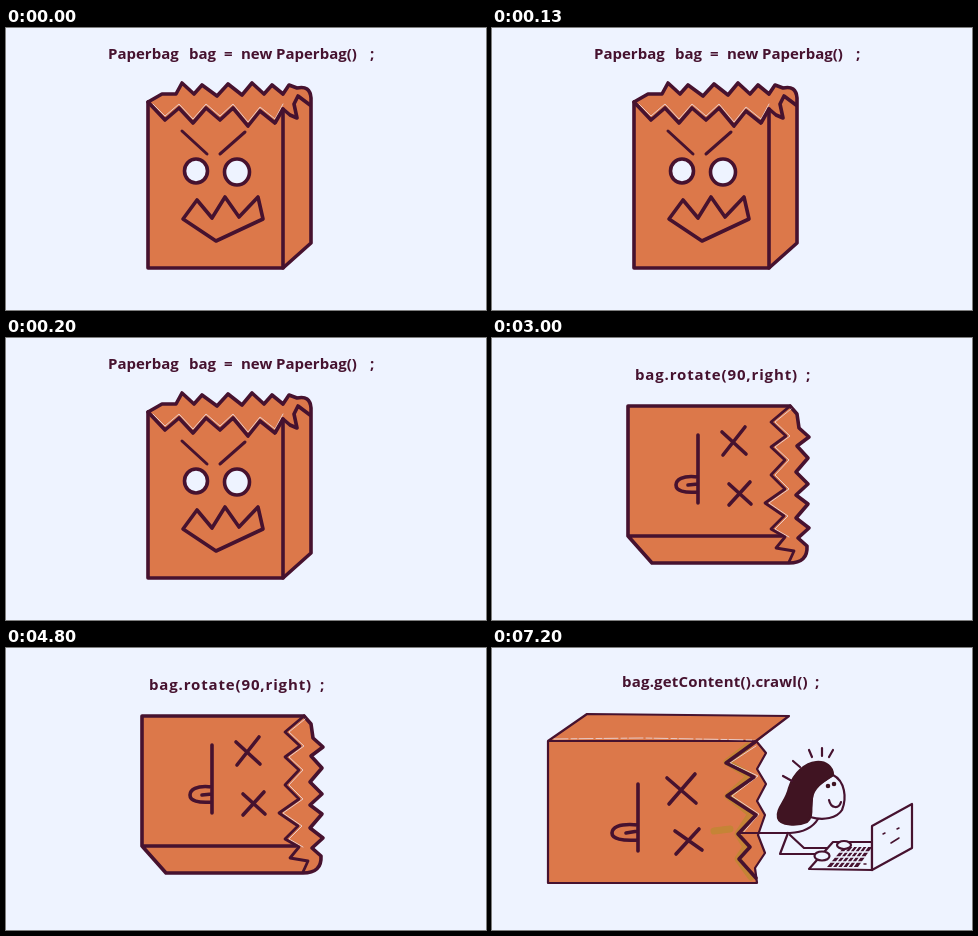
An HTML page that plays this animation: 480 px wide and 282 px high, repeating every 8 s.

```html
<!DOCTYPE html>
<html lang="en">
<head>
<meta charset="utf-8">
<title>Paperbag</title>
<style>
html, body { margin: 0; width: 100%; height: 100%; overflow: hidden; background: #eef3ff; }
svg { display: block; width: 100vw; height: 100vh; }
.scene { fill: none; stroke: #46122f; stroke-width: 3.6; stroke-linejoin: round; stroke-linecap: round; }
.scene:not(.on) { display: none; }
text { font: 700 15px "Open Sans", "Noto Sans", sans-serif; fill: #46122f; stroke: none; white-space: pre; }
.bag { fill: #dc784a; stroke: none; }
.pale { fill: #eef3ff; }
.hair { fill: #401422; stroke: #401422; }
.glint { stroke: #e9ccc9; stroke-width: 1; }
.smear { stroke: #c58436; stroke-width: 7; }
.thin { stroke-width: 2.2; }
</style>
</head>
<body>
<svg viewBox="0 0 480 282" xmlns="http://www.w3.org/2000/svg">
  <rect width="480" height="282" fill="#eef3ff"/>

  <g class="scene on">
    <text y="31"><tspan x="102">Paperbag</tspan> <tspan x="183">bag</tspan> <tspan x="218">=</tspan> <tspan x="235">new</tspan> <tspan x="270">Paperbag()</tspan> <tspan x="364">;</tspan></text>
    <path class="bag" d="M142 74L156 66L170 66L176 55L188 66L196 57L211 68L222 56L236 67L246 55L258 66L266 57L277 66L283 57L291 60Q304 57 305 70V215L277 240H142Z"/>
    <path d="M142 74L156 66L170 66L176 55L188 66L196 57L211 68L222 56L236 67L246 55L258 66L266 57L277 66L283 57L291 60Q304 57 305 70V215L277 240H142V74"/>
    <path class="glint" d="M147 76L159 88L173 76L187 91L200 76L214 88L227 76L242 94L254 79L269 91L277 76"/>
    <path d="M142 74L159 92L173 80L187 95L200 80L214 92L227 80L242 98L254 83L269 95L277 81L284 87L291 90L288 76L292 68L304 77"/>
    <path d="M277 81V240"/>
    <path class="brow" stroke-width="3" d="M176 103L201 126M239 104L214 126"/>
    <ellipse class="pale" cx="190" cy="143" rx="11.5" ry="12"/>
    <ellipse class="pale" cx="231" cy="144" rx="12.5" ry="13"/>
    <path d="M177 191L191 172L206 190L219 169L233 189L252 169L257 191L210 213Z"/>
  </g>

  <g class="scene">
    <text y="42" letter-spacing=".85"><tspan x="143">bag.rotate(90,right)</tspan> <tspan x="314">;</tspan></text>
    <path class="bag" d="M136 68H298L305 76L307 90L317 99L305 108L316 120L304 134L316 146L304 157L316 166L304 180L317 190L306 200L315 208Q316 225 297 225H160L136 198Z"/>
    <path d="M298 68L305 76L307 90L317 99L305 108L316 120L304 134L316 146L304 157L316 166L304 180L317 190L306 200L315 208Q316 225 297 225H160L136 198V68H298M136 198H290"/>
    <path class="glint" d="M299 71L283 84L298 98L283 109L297 122L283 137L297 151L277 165L296 178L283 191L297 199"/>
    <path stroke-width="2.8" d="M298 68L279 84L294 98L279 109L293 122L279 137L293 151L273 165L292 178L279 191L293 199L284 210L302 213L297 224"/>
    <path d="M206 97V165M206 139C190 137 184 142 184 147C184 153 192 155 206 154M206 146L196 147"/>
    <path d="M230 94L254 116M253 89L231 117M237 146L259 166M258 144L237 167"/>
  </g>

  <g class="scene">
    <text y="39" letter-spacing=".2"><tspan x="130">bag.getContent().crawl()</tspan> <tspan x="323">;</tspan></text>
    <path class="bag" d="M56 93L95 66L297 68L265 94L274 105L265 121L274 136L265 153L273 167L266 187L273 205L263 220L265 235H56Z"/>
    <path class="smear" d="M256 98L235 114L258 128L236 148L259 166L246 186L254 199L246 211L259 229M222 183L238 181"/>
    <path class="thin" d="M264 93L297 68L95 66L56 93V235H264M56 93H264"/>
    <path class="glint" d="M62 91L150 90L262 92" stroke-dasharray="14 3 6 2"/>
    <path class="thin" d="M265 94L274 105L265 121L274 136L265 153L273 167L266 187L273 205L263 220L265 235"/>
    <path class="glint" d="M264 98L238 115L266 128L240 148L267 166L250 186"/>
    <path d="M263 94L234 115L262 129L235 148L264 167L246 186L258 199L247 211L264 230"/>
    <path d="M146 136V203M146 177C126 175 120 180 120 185C120 191 130 193 146 192M146 183L134 185"/>
    <path d="M175 130L204 155M203 126L177 156M183 183L210 202M207 181L184 206"/>

    <g class="thin">
      <path d="M248 185H298Q318 184 326 171M296 185L288 206H324M298 187L312 200L346 200"/>
      <path class="pale" d="M341 127C353 133 355 150 350 162C345 170 332 173 318 169L321 140Z"/>
      <path class="hair" d="M286 170C284 160 294 154 297 140C302 124 314 115 324 114C334 113 341 119 341 127C330 134 321 140 320 150C318 160 322 168 315 174C306 178 288 178 286 170Z"/>
      <circle class="hair" cx="336" cy="138" r="1.2"/>
      <circle class="hair" cx="342" cy="136" r="1.2"/>
      <path d="M337 152C339 161 347 161 349 154"/>
      <path d="M291 128L300 133M301 113L308 119M317 102L320 109M330 100V108M341 102L337 109"/>
      <path class="pale" d="M380 222L317 221L341 194H380Z"/>
      <path class="pale" d="M380 178L420 156V200L380 222Z"/>
      <path fill="#46122f" stroke="none" d="M335 219L352 199H380L366 219Z"/>
      <g id="keys" stroke="#eef3ff" stroke-width="1.4"></g>
      <ellipse class="pale" cx="330" cy="208" rx="7.5" ry="4.5"/>
      <ellipse class="pale" cx="352" cy="197" rx="7" ry="4"/>
      <path stroke-width="1.5" d="M391 186L393 185M405 181L407 180M399 195L407 190M372 216H374"/>
    </g>
  </g>
</svg>
<script>
const LOOP = 8000;
const starts = [0, 3000, 6000];
const scenes = [...document.querySelectorAll('.scene')];

// Gaps between the laptop keys
let gaps = '';
for (let i = 1; i < 4; i++) {
  const k = i / 4, y = 219 - 20 * k;
  gaps += `M${335 + 17 * k} ${y}L${366 + 14 * k} ${y}`;
}
for (let i = 1; i < 6; i++) {
  const k = i / 6;
  gaps += `M${335 + 31 * k} 219L${352 + 28 * k} 199`;
}
document.getElementById('keys').innerHTML = `<path d="${gaps}"/>`;

function draw(now) {
  const t = now % LOOP;
  const at = starts.filter(s => s <= t).length - 1;
  scenes.forEach((g, i) => g.classList.toggle('on', i === at));
}

const t0 = performance.now();
function tick() {
  draw(performance.now() - t0);
  requestAnimationFrame(tick);
}
tick();
</script>
</body>
</html>
```
